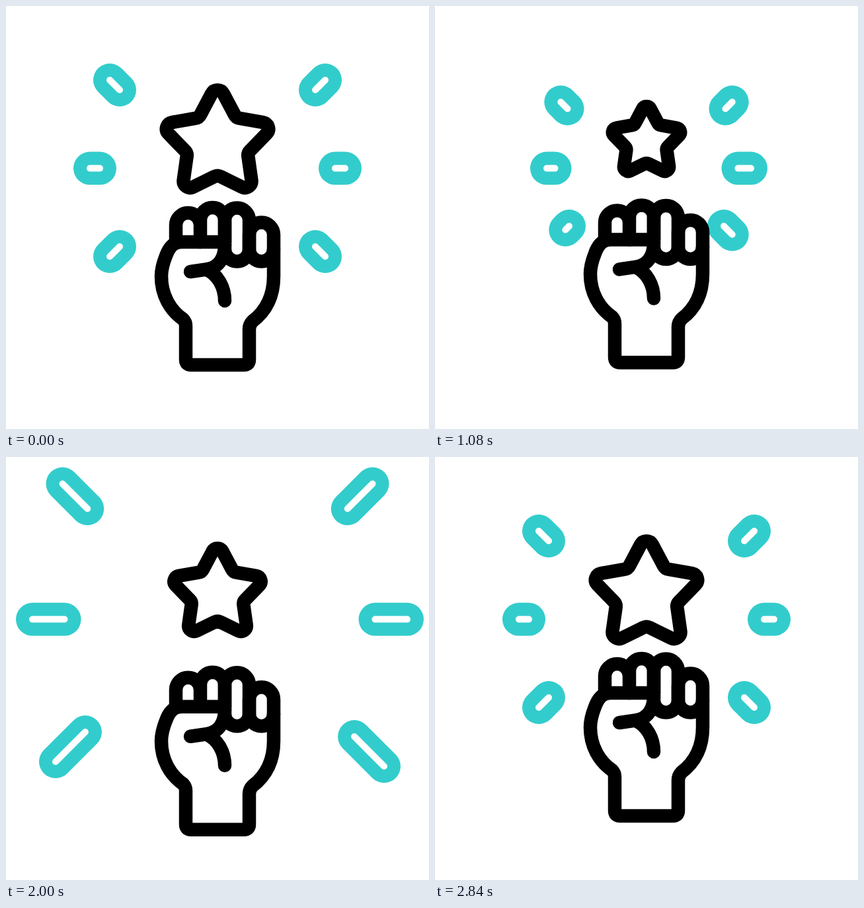
Animation of 640x640 px, one loop 3000 ms. Source, as an HTML page:

```html
<!DOCTYPE html>
<html lang="en">
<head>
<meta charset="utf-8">
<title>Raised fist and star</title>
<style>
  html, body { margin: 0; width: 100%; height: 100%; overflow: hidden; background: #fff; }
  svg { display: block; width: 100%; height: 100%; }
  g { fill: none; stroke-linecap: round; stroke-linejoin: round; }
</style>
</head>
<body>
<svg viewBox="0 0 640 640">
  <g stroke="#33cccc" stroke-width="50"><path id="rays"/></g>
  <g stroke="#fff" stroke-width="10"><path id="cores"/></g>
  <g stroke="#000" stroke-width="20.5">
    <path id="star"/>
    <g id="hand">
      <path d="M257 357V331.5a18.5 18.5 0 0 1 37 0V357M294 331.5V323.5a18.5 18.5 0 0 1 37 0V357"/>
      <rect x="331" y="305.5" width="37" height="81" rx="18.5"/>
      <rect x="368" y="327.5" width="37" height="59" rx="18.5"/>
      <path d="M331 357H266C252 357 246 367 242 378C238 388 235 398 235 409C235 437 248 460 268 474Q272 478 272 484V535Q272 543 280 543H360Q368 543 368 535V489Q368 482 373 477C394 461 405 438 405 409V368"/>
      <path d="M331 361C331 381 322 396 303 398.5L279 402M303 398.5C320 406 331 425 331 446"/>
    </g>
  </g>
</svg>
<script>
const LOOP = 3000, STEP = 40, CX = 320, CY = 201;
const byId = id => document.getElementById(id);
const mix = (a, b, k) => a + (b - a) * k;

// Smooth 0 to 1 between two times.
function ramp(t, from, to) {
  const u = Math.min(1, Math.max(0, (t - from) / (to - from)));
  return u * u * (3 - 2 * u);
}

// The fist winds up and punches twice, then settles.
const handY = t => 81 * ramp(t, 205, 590) - 85 * ramp(t, 740, 1095)
  + 47 * (ramp(t, 1220, 1730) - ramp(t, 1730, 2290)) + 4 * ramp(t, 2310, 2830);

// The star shrinks, then bursts open on each punch.
const starScale = t => 1 - 0.338 * (ramp(t, 205, 605) - ramp(t, 2310, 2830))
  + 0.663 * (ramp(t, 1160, 1520) - ramp(t, 1760, 2130));

// Mirrored rows of rays: rest position, slope, and the outer and inner
// offsets toward the middle when squeezed (near) and shot out (far).
const rows = [
  { x: 163, y: 112, slope: 1, near: [33.3, 43.5], far: [-71.5, 23], skew: 0 },
  { x: 193, y: 245.6, slope: 0, near: [38.5, 54.5], far: [-90.5, 31], skew: 3.5 },
  { x: 163, y: 379, slope: -1, near: [36.8, 46], far: [-85.5, 27], skew: 3.5 }
];

function rayPath(t, { x, y, slope, near, far, skew }, side) {
  const shift = skew * -side, burst = ramp(t, 1335, 1760);
  const end = far[0] + shift;
  let outer = mix(0, near[0] + shift, ramp(t, 480, 1030));
  let inner = mix(15, near[1], ramp(t, 220, 800));
  outer = mix(mix(outer, end, burst), 0, ramp(t, 2200, 2825));
  inner = mix(mix(inner, far[1] + shift, burst), end, ramp(t, 1790, 2160));
  inner = mix(inner, 15, ramp(t, 2200, 2700));
  const point = d => [CX + side * (x - d), y + slope * d];
  return inner - outer > 0.1 ? `M${point(outer)}L${point(inner)}` : "";
}

// Five-pointed star with every corner rounded.
function starPath(scale) {
  const corner = i => {
    const a = i * Math.PI / 5, r = i % 2 ? 48 : 92;
    return [CX + scale * r * Math.sin(a), CY + scale * (6.8 - r * Math.cos(a))];
  };
  const toward = ([x, y], [px, py], d) => {
    const k = d / Math.hypot(px - x, py - y);
    return [mix(x, px, k), mix(y, py, k)];
  };
  let d = "";
  for (let i = 0; i < 10; i++) {
    const p = corner(i), cut = scale * (i % 2 ? 5.2 : 18.8), r = 10 * scale;
    d += `${i ? "L" : "M"}${toward(p, corner(i - 1), cut)}A${r} ${r} 0 0 ${1 - i % 2} ${toward(p, corner(i + 1), cut)}`;
  }
  return d + "Z";
}

function draw(now) {
  const t = Math.floor(now % LOOP / STEP) * STEP;
  const rays = rows.map(row => rayPath(t, row, -1) + rayPath(t, row, 1)).join("");
  byId("rays").setAttribute("d", rays);
  byId("cores").setAttribute("d", rays);
  byId("star").setAttribute("d", starPath(starScale(t)));
  byId("hand").setAttribute("transform", `translate(0 ${handY(t)})`);
}

const start = performance.now();
function tick() {
  draw(performance.now() - start);
  requestAnimationFrame(tick);
}
tick();
</script>
</body>
</html>
```
